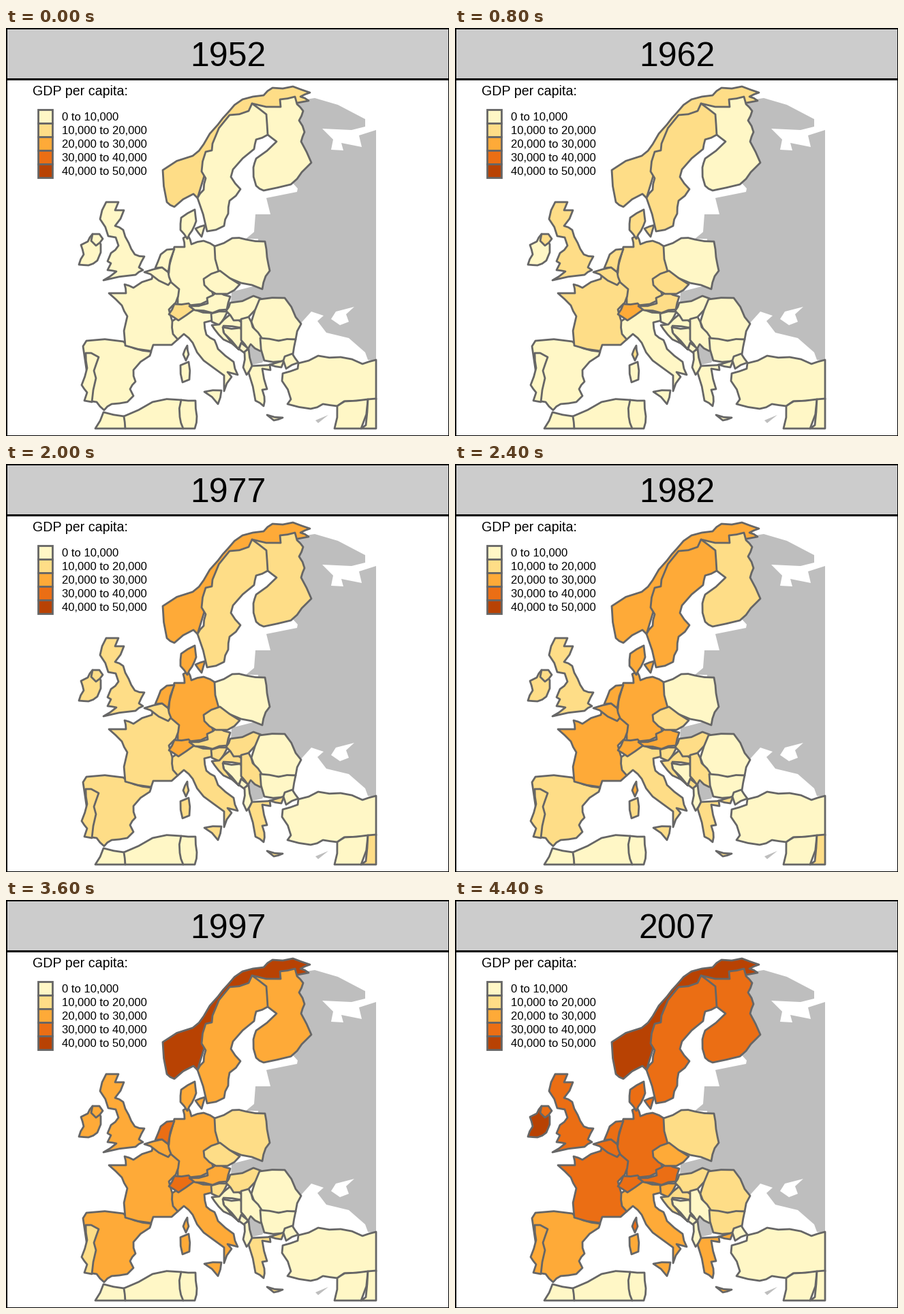
Write a matplotlib script that moves like this. It is 650 px wide and 600 px high and loops after 4800 ms.

```python
import math
import random

import matplotlib.pyplot as plt
from matplotlib.animation import FuncAnimation
from matplotlib.patches import Polygon, Rectangle

W, H, DPI = 650, 600, 100
PX = 72 / DPI
SHADES = ["#FFF7C6", "#FEDD87", "#FEAA38", "#EB6E14", "#B84203"]
EDGE, MISSING = "#666666", "#BEBEBE"
YEARS = range(1952, 2008, 5)

# Years in which a country moves up one class (negative: down one class).
STEPS = {
    "Norway": [1952, 1977, 1987, 1997],
    "Sweden": [1962, 1982, 2007],
    "Finland": [1967, 1987, 2007],
    "Denmark": [1957, 1977, 2002],
    "UK": [1957, 1987, 2007],
    "Ireland": [1977, 1997, 2002, 2007],
    "France": [1962, 1982, 2007],
    "Spain": [1972, 1997],
    "Portugal": [1977, 2007],
    "Belgium": [1962, 1982, 2002],
    "Netherlands": [1957, 1977, 1997],
    "Germany": [1957, 1977, 2002],
    "Switzerland": [1952, 1962, 1987],
    "Austria": [1962, 1982, 2002],
    "Czechia": [1962, 2007],
    "Poland": [1997],
    "Italy": [1967, 1992],
    "Slovenia": [1972, 2002],
    "Croatia": [1977, -1992, 2002],
    "Serbia": [1972, -1992],
    "Montenegro": [1982, -1992],
    "Hungary": [1972],
    "Romania": [2007],
    "Bulgaria": [2007],
    "Greece": [1972, 2002],
    "Iraq": [1977, -1992],
}

fig = plt.figure(figsize=(W / DPI, H / DPI), dpi=DPI, facecolor="white")
ax = fig.add_axes([0, 0, 1, 1])
ax.set_xlim(0, W)
ax.set_ylim(H, 0)
ax.axis("off")

lands = []


def rough(corners, seed):
    """Bend long slanted edges a little, as on a coarse coastline."""
    rng = random.Random(seed)
    pts = []
    for (x0, y0), (x1, y1) in zip(corners, corners[1:] + corners[:1]):
        pts.append((x0, y0))
        dx, dy = x1 - x0, y1 - y0
        if dx and dy and math.hypot(dx, dy) > 13:
            bend = rng.uniform(-0.08, 0.08)
            pts.append((x0 + dx / 2 - dy * bend, y0 + dy / 2 + dx * bend))
    return pts


def pairs(xy):
    return list(zip(xy[::2], xy[1::2]))


def plain(color, *xy):
    ax.add_patch(Polygon(pairs(xy), fc=color, ec="none"))


def land(name, *xy):
    patch = Polygon(rough(pairs(xy), name), fc=SHADES[0], ec=EDGE,
                    lw=2.8 * PX, joinstyle="round")
    lands.append((name, ax.add_patch(patch)))


def label(x, y, text, size, **style):
    return ax.text(x, y, text, fontsize=size * PX, family="Liberation Sans",
                   color="black", va="baseline", **style)


def box(x, y, w, h, fill, edge, lw):
    ax.add_patch(Rectangle((x, y), w, h, fc=fill, ec=edge, lw=lw * PX))


# Areas without data; lands drawn later cover their inner edges.
plain(MISSING, 428, 107, 453, 103, 487, 113, 527, 134, 527, 145, 507, 150,
      464, 148, 480, 164, 477, 179, 495, 180, 492, 169, 522, 175, 518, 158,
      543, 150, 543, 490, 531, 488, 527, 477, 503, 456, 470, 448, 457, 431,
      466, 423, 448, 417, 430, 437, 380, 420, 330, 404, 331, 388, 370, 378,
      370, 310, 352, 310, 364, 300, 366, 274, 388, 274, 382, 250, 427, 241,
      428, 236, 418, 225)
plain("white", 477, 428, 484, 417, 511, 410, 499, 421, 503, 432, 490, 437)
plain(MISSING, 354, 470, 374, 464, 380, 486, 376, 492, 358, 496)
plain(MISSING, 454, 577, 473, 569, 458, 581)

# Northern Europe
land("Norway", 230, 209, 274, 188, 290, 171, 311, 142, 326, 124, 347, 105,
     378, 99, 391, 88, 421, 86, 446, 95, 432, 101, 444, 107, 404, 117,
     360, 125, 310, 185, 281, 250, 275, 244, 247, 263, 236, 256)
land("Finland", 361, 111, 403, 116, 402, 105, 424, 101, 427, 112, 436, 122,
     430, 136, 438, 153, 433, 167, 448, 198, 434, 212, 418, 230, 378, 239,
     367, 232, 363, 205, 367, 192, 397, 167, 384, 157)
land("Sweden", 281, 250, 290, 238, 293, 221, 287, 211, 293, 182, 302, 180,
     303, 170, 328, 128, 356, 122, 361, 111, 382, 127, 384, 157, 367, 164,
     364, 178, 333, 208, 330, 219, 344, 237, 328, 254, 326, 273, 320, 291,
     295, 299)
land("UK", 147, 256, 165, 256, 160, 268, 173, 268, 160, 291, 172, 297,
     180, 316, 189, 333, 203, 336, 195, 352, 201, 356, 190, 363, 143, 371,
     162, 358, 149, 356, 154, 346, 149, 343, 154, 331, 165, 320, 161, 308,
     150, 306, 138, 281)
land("Ireland", 127, 303, 139, 318, 139, 330, 134, 342, 121, 349, 107, 348,
     114, 333, 110, 319, 120, 314)
land("UK", 127, 303, 137, 303, 142, 310, 132, 320, 125, 313)

# Central and western Europe
land("Germany", 260, 309, 267, 305, 272, 318, 290, 313, 308, 322, 316, 357,
     300, 375, 305, 396, 286, 406, 252, 408, 252, 390, 236, 372, 240, 348,
     247, 322, 262, 322)
land("Denmark", 256, 288, 257, 279, 277, 267, 279, 284, 273, 298, 266, 310,
     256, 297)
land("Denmark", 278, 295, 292, 290, 287, 307)
land("Poland", 306, 321, 332, 309, 352, 311, 380, 314, 383, 337, 387, 357,
     381, 365, 376, 384, 345, 375, 312, 358)
land("Spain", 113, 468, 118, 460, 172, 461, 188, 471, 213, 476, 211, 482,
     187, 503, 190, 520, 182, 531, 187, 541, 178, 550, 155, 553, 144, 562,
     133, 550, 126, 549)
land("Portugal", 117, 478, 125, 478, 136, 484, 129, 504, 132, 515, 126, 550,
     115, 548, 119, 536, 111, 525, 119, 500)
land("France", 151, 390, 176, 390, 174, 377, 187, 382, 214, 369, 216, 360,
     254, 384, 249, 404, 239, 414, 248, 441, 252, 458, 243, 466, 216, 466,
     213, 475, 175, 467, 178, 424, 170, 408)
land("France", 266, 467, 268, 480, 264, 489, 260, 480)
land("Belgium", 203, 359, 229, 352, 238, 359, 242, 373, 238, 378, 212, 362)
land("Netherlands", 219, 353, 227, 333, 236, 326, 247, 325, 238, 359, 229, 352)
land("Italy", 245, 450, 244, 431, 276, 414, 303, 419, 303, 430, 291, 433,
     294, 451, 306, 459, 311, 472, 334, 491, 340, 510, 325, 506, 331, 513,
     320, 534, 320, 511, 290, 489, 274, 463, 261, 450, 252, 458)
land("Italy", 291, 535, 316, 533, 311, 553)
land("Italy", 268, 491, 269, 517, 259, 521, 256, 496)
land("Switzerland", 239, 421, 247, 406, 268, 405, 276, 414, 253, 430)
land("Austria", 269, 409, 296, 405, 295, 397, 311, 387, 329, 395, 324, 414,
     303, 419, 277, 415)
land("Czechia", 290, 369, 314, 357, 343, 377, 325, 391, 308, 391, 291, 378)

# South-eastern Europe
land("Slovenia", 302, 432, 301, 420, 325, 417, 313, 437)
land("Croatia", 302, 437, 313, 436, 328, 422, 346, 433, 345, 441, 319, 438,
     319, 447, 342, 473, 319, 458, 306, 443)
land("Bosnia", 318, 440, 344, 441, 348, 450, 341, 472, 320, 449)
land("Hungary", 323, 416, 329, 404, 363, 394, 374, 398, 354, 427, 334, 430)
land("Romania", 372, 399, 409, 397, 425, 425, 433, 435, 425, 458, 400, 460,
     373, 456, 360, 432)
land("Serbia", 345, 428, 356, 425, 362, 440, 376, 457, 378, 470, 373, 475,
     359, 465, 355, 472, 345, 459)
land("Montenegro", 345, 463, 355, 471, 350, 478, 342, 472)
land("Albania", 350, 476, 356, 472, 361, 497, 353, 510, 348, 499)
land("Bulgaria", 373, 456, 400, 460, 425, 458, 421, 480, 405, 490, 379, 489)
land("Greece", 356, 507, 361, 497, 408, 489, 404, 499, 387, 495, 388, 503,
     376, 501, 383, 531, 376, 532, 379, 542, 378, 556, 366, 548)
land("Greece", 383, 569, 406, 573, 393, 577)
land("Turkey", 407, 489, 409, 483, 420, 479, 429, 492, 411, 501)
land("Turkey", 406, 508, 428, 501, 429, 493, 458, 482, 491, 484, 523, 494,
     543, 488, 543, 546, 496, 549, 486, 556, 465, 553, 447, 560, 413, 553,
     418, 546, 405, 519)

# Southern edge, cut off by the map window
land("Syria", 482, 589, 486, 556, 497, 549, 531, 546, 521, 589)
land("Iraq", 531, 546, 543, 545, 543, 589, 521, 589, 528, 584)
land("Morocco", 131, 589, 143, 565, 173, 571, 175, 589)
land("Algeria", 173, 571, 215, 550, 257, 547, 260, 589, 175, 589)
land("Tunisia", 257, 547, 278, 548, 280, 571, 277, 589, 260, 589, 255, 572)

# Header, frame and legend
box(0, 0, W, 74.5, "#CCCCCC", "black", 3)
box(0, 0, W, H, "none", "black", 3)
title = label(325.5, 56.5, "", 50, ha="center")
label(39, 99, "GDP per capita:", 19.6)
for i, shade in enumerate(SHADES):
    box(46.5, 120 + 20 * i, 21, 20, shade, EDGE, 2.8)
    label(82, 136 + 20 * i, f"{i * 10000:,} to {(i + 1) * 10000:,}", 16.6)


def level(name, year):
    return sum(1 if s > 0 else -1 for s in STEPS.get(name, []) if year >= abs(s))


def draw(i):
    year = YEARS[i]
    title.set_text(str(year))
    for name, patch in lands:
        patch.set_facecolor(SHADES[level(name, year)])
    return [title] + [patch for _, patch in lands]


anim = FuncAnimation(fig, draw, frames=len(YEARS), interval=400,
                     repeat=True, repeat_delay=0, blit=False)
plt.show()
```
